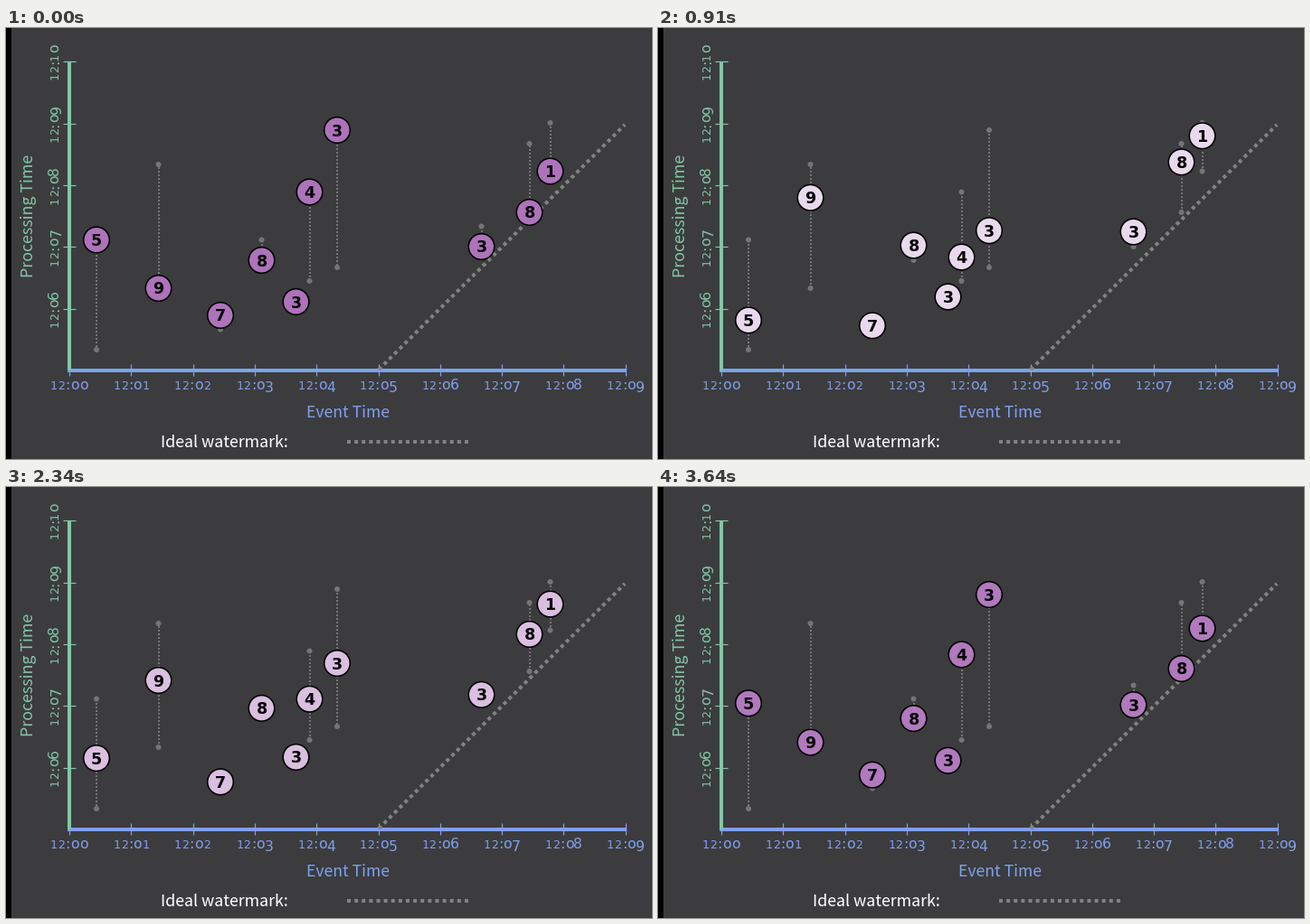
A matplotlib script that plays this animation: 714 by 477 pixels, repeating every 3770 ms.

```python
import numpy as np
import matplotlib.pyplot as plt
from matplotlib.animation import FuncAnimation
from matplotlib.patches import Circle, Rectangle

W, H, DPI = 714, 477, 64
FRAMES, STEP = 29, 130
LABEL_FONT, DIGIT_FONT = "Noto Sans CJK JP", "DejaVu Sans"
BG, GREEN, BLUE = "#3c3c3e", "#82c6a6", "#7fa0f0"
GREY, DIM = "#828282", "#757575"
PURPLE = np.array([174, 115, 187]) / 255
X0, Y0, UNIT = 70, 379, 68.3

# value, x, start y, end y
EVENTS = [
    (5, 100, 234.5, 356), (9, 168.5, 288, 151), (7, 237, 318, 333.5),
    (8, 282.5, 257, 234.5), (3, 320.5, 303, 295.5), (4, 335.5, 181.5, 280),
    (3, 366, 113, 265), (3, 525.5, 242, 219.5), (8, 578.5, 204, 128),
    (1, 601.5, 158.5, 105),
]


def pt(px):
    return px * 72 / DPI


fig = plt.figure(figsize=(W / DPI, H / DPI), dpi=DPI, facecolor=BG)
ax = fig.add_axes([0, 0, 1, 1])
ax.set(xlim=(0, W), ylim=(H, 0))
ax.axis("off")


def line(xs, ys, color, width, z=2, **kw):
    ax.plot(xs, ys, color=color, lw=pt(width), zorder=z,
            solid_capstyle="butt", dash_capstyle="butt", **kw)


def text(x, y, s, size, color, font=LABEL_FONT, z=3, **kw):
    return ax.text(x, y, s, fontsize=pt(size), color=color, family=font,
                   ha="center", va="baseline", rotation_mode="anchor",
                   zorder=z, **kw)


def clock(x, y, label, color, upright=False):
    """Time label with old-style figures, centred on (x, y)."""
    advance = {"1": 7.6, "0": 10.2, ":": 4.9}
    widths = [advance.get(c, 9.2) for c in label]
    pos = -sum(widths) / 2
    for c, w in zip(label, widths):
        along = pos + w / 2
        pos += w
        drop = 7.3 if c in "34579" else 4.5
        size = 12.6 if c in "12" else 15.6
        glyph = "o" if c == "0" else c
        dx, dy = (drop, -along) if upright else (along, drop)
        text(x + dx, y + dy, glyph, size, color, DIGIT_FONT,
             rotation=90 * upright)


def smooth(t, start, span=900):
    u = np.clip((t - start) / span, 0, 1)
    return (1 - np.cos(np.pi * u)) / 2


def progress(t):
    return smooth(t, 322) - smooth(t, 1913) + smooth(t, 3525)


ax.add_patch(Rectangle((0, 0), 6, H, color="black", lw=0))

# axes
line([X0 - 2, X0 + 9 * UNIT + 1], [Y0, Y0], BLUE, 4)
line([X0, X0], [37, Y0], GREEN, 4, z=2.5)
for i in range(10):
    x = X0 + i * UNIT
    line([x, x], [Y0 - 7, Y0 + 6], BLUE, 1.2)
    clock(x, 396, f"12:{i:02d}", BLUE)
for i in range(5):
    y = 310.5 - i * UNIT
    line([63, 77], [y, y], GREEN, 1.2)
    clock(53.5, y, f"12:{i + 6:02d}", GREEN, upright=True)
text(378, 431, "Event Time", 17.6, BLUE)
text(29.5, 207.5, "Processing Time", 17.9, GREEN, rotation=90)
text(241, 464, "Ideal watermark:", 17.8, "white")

# watermark and its key
dots = (0, (1, 1.03))
line([412, 684], [378, 107], GREY, 4, linestyle=dots)
line([377, 515], [457.5, 457.5], GREY, 4, linestyle=dots)

balls = []
for k, (value, x, ya, yb) in enumerate(EVENTS):
    line([x, x], [ya, yb], DIM, 2, linestyle=(0, (1, 1)))
    for y in (ya, yb):
        ax.add_patch(Circle((x, y), 3, color=DIM, lw=0, zorder=2))
    ball = Circle((x, ya), 14.3, ec="black", lw=pt(1.6), zorder=4 + k)
    ax.add_patch(ball)
    label = text(x, ya, str(value), 17.5, "black", DIGIT_FONT, z=4.5 + k,
                 weight="bold")
    balls.append((ball, label, x, ya, yb))


def draw(i):
    s = progress(i * STEP)
    color = PURPLE + (1 - PURPLE) * s
    for ball, label, x, ya, yb in balls:
        y = ya + (yb - ya) * s
        ball.center = x, y
        ball.set_facecolor(color)
        label.set_y(y + 6.5)
    return [a for b in balls for a in b[:2]]


anim = FuncAnimation(fig, draw, frames=FRAMES, interval=STEP, repeat=True,
                     repeat_delay=0)
plt.show()
```
